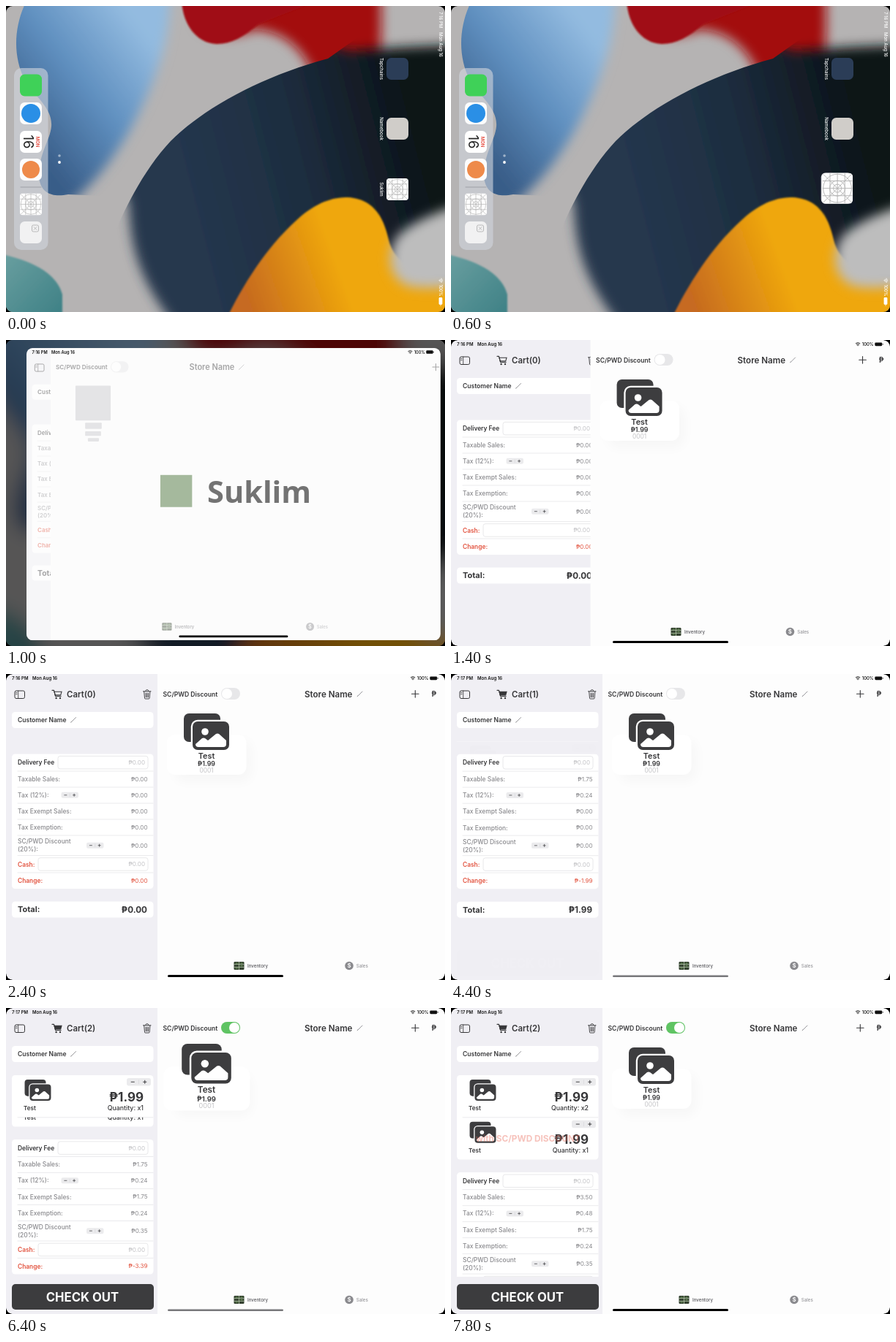
Recreate the animation shown at these times as an HTML page. Size 600 by 419 pixels, loop 8000 ms.

```html
<!DOCTYPE html>
<html lang="en">
<head>
<meta charset="utf-8">
<title>Point of sale demo</title>
<style>
  html, body { margin: 0; width: 100%; height: 100%; overflow: hidden; background: #000; }
  svg { display: block; width: 100vw; height: 100vh; font-family: Inter, Roboto, sans-serif; }
</style>
</head>
<body>
<svg viewBox="0 0 600 419" preserveAspectRatio="none">
  <defs>
    <clipPath id="screen"><rect width="600" height="419" rx="9"/></clipPath>
    <filter id="soft1"><feGaussianBlur stdDeviation="1"/></filter>
    <filter id="soft8" x="-30%" y="-30%" width="160%" height="160%"><feGaussianBlur stdDeviation="8"/></filter>
    <filter id="soft12" x="-30%" y="-30%" width="160%" height="160%"><feGaussianBlur stdDeviation="12"/></filter>
    <linearGradient id="blue" gradientUnits="userSpaceOnUse" x1="45" y1="205" x2="215" y2="70">
      <stop offset="0" stop-color="#395d88"/><stop offset=".5" stop-color="#5f8fbf"/><stop offset="1" stop-color="#93bbe0"/>
    </linearGradient>
    <linearGradient id="navy" gradientUnits="userSpaceOnUse" x1="250" y1="270" x2="565" y2="190">
      <stop offset="0" stop-color="#25374e"/><stop offset=".5" stop-color="#1d2d3f"/><stop offset="1" stop-color="#0c1318"/>
    </linearGradient>
    <linearGradient id="orange" gradientUnits="userSpaceOnUse" x1="325" y1="390" x2="450" y2="345">
      <stop offset="0" stop-color="#c66a20"/><stop offset="1" stop-color="#efa70c"/>
    </linearGradient>
    <linearGradient id="teal" x1="0" y1="0" x2="1" y2="1">
      <stop offset="0" stop-color="#6a9fa0"/><stop offset="1" stop-color="#3d8085"/>
    </linearGradient>
    <!-- Sharp edges are clips; the blurred shapes inside reach past them -->
    <clipPath id="blueEdge"><path d="M27 -5 C10 30 10 70 25 100 C40 125 64 140 62 165 C60 185 45 200 45 235 C48 258 65 262 85 258 L130 260 L300 200 V-5Z"/></clipPath>
    <clipPath id="navyEdge"><path d="M130 425 L145 320 C160 280 190 222 225 185 C270 140 350 96 440 72 L520 15 L620 -5 V425Z"/></clipPath>

    <symbol id="wallpaper" viewBox="0 0 600 419">
      <rect width="600" height="419" fill="#b5b3b3"/>
      <g clip-path="url(#blueEdge)">
        <path d="M-40 -40 V290 H60 C125 250 170 180 200 105 C218 60 226 20 224 -40Z" fill="url(#blue)" filter="url(#soft8)"/>
      </g>
      <path d="M262 -40 V25 C280 45 310 44 340 32 C375 34 405 55 420 95 H508 C515 50 512 0 512 -40Z" fill="#a30f11" filter="url(#soft8)"/>
      <path d="M240 -5 C244 35 268 52 288 52 C308 52 325 42 345 25 L420 -5Z" fill="#a00e12" filter="url(#soft1)"/>
      <g clip-path="url(#navyEdge)">
        <path d="M660 52 C600 54 530 56 470 62 L400 40 L250 95 L140 215 L168 270 C170 330 180 375 240 450 H660Z" fill="url(#navy)" filter="url(#soft8)"/>
      </g>
      <path d="M303 425 C328 374 361 324 404 287 C430 266 450 262 467 262 C500 264 515 285 523 320 C530 350 560 370 620 372 V425Z" fill="url(#orange)" filter="url(#soft1)"/>
      <path d="M660 258 C600 278 550 295 533 318 C518 345 525 375 552 384 C580 389 620 383 660 378Z" fill="#bdbdbd" filter="url(#soft8)"/>
      <path d="M-5 340 C40 350 70 368 77 395 L77 425 H-5Z" fill="url(#teal)" filter="url(#soft1)"/>
    </symbol>

    <symbol id="grid" viewBox="0 0 100 100">
      <rect width="100" height="100" rx="13" fill="#fdfdfd"/>
      <g fill="none" stroke="#b4b4b4" stroke-width="2.2">
        <path d="M4 4 96 96M4 96 96 4M26 2V98M50 2V98M74 2V98M2 26H98M2 50H98M2 74H98"/>
        <circle cx="50" cy="50" r="13"/><circle cx="50" cy="50" r="25"/><circle cx="50" cy="50" r="46"/>
      </g>
    </symbol>

    <symbol id="photos" viewBox="-3 -3 68 56">
      <rect width="50" height="39" rx="7" fill="#3d3d3f"/>
      <rect x="12" y="11" width="50" height="39" rx="7" fill="#3d3d3f" stroke="#fff" stroke-width="4.5" paint-order="stroke"/>
      <circle cx="29" cy="25" r="4.8" fill="#fff"/>
      <path d="M16 42 25 34Q27 33 29 34L33 37 44 28Q46 27 48 28L58 37V42Q58 46 54 46H20Q16 46 16 42Z" fill="#fff"/>
    </symbol>
  </defs>
  <g id="scene"></g>
</svg>

<script>
const LOOP = 8000, STEP = 200;
const INK = '#363638', GREY = '#88888c', PALE = '#c3c3c6', RED = '#e2533f', PANEL = '#f0eff4';
const APP = 'Suklim';
const ROW = 57.8;

const clamp = v => Math.max(0, Math.min(1, v));
const lerp = (a, b, k) => a + (b - a) * k;
const ease = v => (1 - Math.cos(Math.PI * clamp(v))) / 2;
const peso = v => '₱' + v.toFixed(2);

const text = (x, y, size, str, { fill = INK, weight = 600, anchor = 'start', turn = 0, more = '' } = {}) =>
  `<text transform="translate(${x} ${y}) rotate(${turn})" y="${size * 0.36}" font-size="${size}" font-weight="${weight}" fill="${fill}" text-anchor="${anchor}" ${more}>${str}</text>`;
const rect = (x, y, w, h, rx, fill, more = '') =>
  `<rect x="${x}" y="${y}" width="${w}" height="${h}" rx="${rx}" fill="${fill}" ${more}/>`;
const line = (d, color = INK, width = 1) =>
  `<path d="${d}" fill="none" stroke="${color}" stroke-width="${width}" stroke-linecap="round" stroke-linejoin="round"/>`;
const use = (id, x, y, w, h) => `<use href="#${id}" x="${x}" y="${y}" width="${w}" height="${h}"/>`;
const circle = (x, y, r, fill) => `<circle cx="${x}" cy="${y}" r="${r}" fill="${fill}"/>`;
const group = (transform, body, more = '') => `<g transform="${transform}" ${more}>${body}</g>`;

function statusIcons(x, y, fill) {
  return line(`M${x - 8.5} ${y - 1.2}q2.8-2.4 5.6 0M${x - 7.4} ${y + .3}q1.7-1.3 3.4 0`, fill, .9) + circle(x - 5.7, y + 1.7, .7, fill) +
    text(x, y, 5.9, '100%', { fill, weight: 500 }) + rect(x + 17.5, y - 2.4, 10, 4.8, 1.4, fill) + rect(x + 28, y - .8, .9, 1.6, .4, fill);
}

// Home screen, shown with the device turned sideways
function home(t) {
  const white = { fill: '#fff', weight: 500, turn: 90 };
  const label = (y, str) => text(513, y, 6.1, str, { ...white, anchor: 'middle' });
  const tile = (x, y, fill) => rect(x - 15, y - 15, 30, 30, 6.5, fill);
  const launching = t >= 600;
  const dock = rect(11, 85, 46.5, 249, 10, 'rgba(208,213,222,.62)') +
    tile(34, 108.5, '#3fd158') +
    tile(34, 147, '#fcfcfc') + circle(34, 147, 13, '#2a8fe6') +
    tile(34, 186, '#fff') + text(43, 186, 6, 'MON', { fill: '#e5483c', anchor: 'middle', turn: 90 }) +
    text(30.5, 186, 18.5, '16', { fill: '#222', weight: 400, anchor: 'middle', turn: 90 }) +
    tile(34, 224, '#fcfcfc') + circle(34, 224, 12, '#ee8a4a') +
    line('M20 248H48', 'rgba(110,115,125,.6)', .8) +
    use('grid', 19, 256.5, 30, 30) +
    tile(34, 310, '#f1f1f2') + rect(35.5, 300, 9, 9, 2, 'none', 'stroke="#aaa" stroke-width=".8"') + line('M38 302.5l4 4m0-4l-4 4', '#aaa', .7);

  let icon = use('grid', 520, 236, 30, 30) + label(251, APP);
  if (launching) {
    const k = t >= 800 ? 1 : .25, size = lerp(30, 79, k);
    const x = lerp(520, 468, k), y = lerp(236, 206, k);
    icon = rect(x - 5 * k, y, size, size, 8 * k + 4, '#dcdcde') + use('grid', x, y, size, size);
  }
  return use('wallpaper', 0, 0, 600, 419) +
    group(`translate(${t >= 800 ? -1.3 : 0} 0)`, dock) +
    circle(73, 205, 1.8, 'rgba(255,255,255,.5)') + circle(73, 214, 1.9, '#fff') +
    tile(535, 86, '#2b3d57') + label(86, 'Tapchains') +
    tile(535, 168, '#d0cdc9') + label(168, 'Namebook') + icon +
    text(594, 8, 6, '7:16 PM', white) + text(594, 36, 6, 'Mon Aug 16', white) +
    group('translate(594 381.5) rotate(90)', statusIcons(0, 0, '#fff'));
}

const stepper = (x, y, w, h) => {
  const a = x + w * .25, b = x + w * .75, m = y + h / 2, r = h * .2;
  return rect(x, y, w, h, h * .28, '#ebebed') + line(`M${x + w / 2} ${y + h * .25}v${h * .5}`, '#cfcfd2', .5) +
    line(`M${a - r} ${m}h${2 * r}M${b - r} ${m}h${2 * r}M${b} ${m - r}v${2 * r}`, INK, h * .09);
};
const pencil = (x, y) => line(`M${x} ${y + 7}l6.5-6.5`, '#98989c', 1) + line(`M${x - .3} ${y + 7.4}l.5-1.2`, '#98989c', .7);

function cartRow(top, quantity) {
  const end = { anchor: 'end' };
  return use('photos', 23.8, top + 4.3, 39.4, 32.5) + text(24, top + 45, 8.1, 'Test') +
    stepper(165, top + 4, 33, 10.5) +
    text(188, top + 30, 17, peso(1.99), { ...end, weight: 700 }) +
    text(188, top + 45, 8.8, 'Quantity: x' + quantity, { ...end, weight: 500 });
}

function summary(top, v) {
  const end = { anchor: 'end', weight: 400, fill: GREY };
  const grey = { fill: GREY, weight: 500 };
  const field = (x, y) => rect(x, y - 8.8, 194 - x, 17.5, 3, '#fff', 'stroke="#e3e3e5" stroke-width=".8"') +
    text(190, y, 8.1, peso(0), { ...end, fill: PALE });
  const entry = (y, name, value) => text(16, y, 8.45, name, grey) + text(193.5, y, 8.1, peso(value), end);
  const seps = [23.5, 45.5, 67.5, 89.5, 111.5, 139, 162.5].map(y => `M16 ${y}H201`).join('');
  const body = rect(8, 0, 193.5, 184.5, 4.5, '#fff') + line(seps, '#e2e2e5', .7) +
    text(16, 11.7, 8.4, 'Delivery Fee') + field(71, 11.7) +
    entry(34.3, 'Taxable Sales:', v.taxable) +
    entry(56.3, 'Tax (12%):', v.tax) + stepper(75.5, 52.3, 23.5, 8) +
    entry(78.5, 'Tax Exempt Sales:', v.exempt) +
    entry(100.8, 'Tax Exemption:', v.exemption) +
    text(16, 119.8, 8.45, 'SC/PWD Discount', grey) + text(16, 130.8, 8.45, '(20%):', grey) +
    text(193.5, 125.2, 8.1, peso(v.discount), end) + stepper(110, 121.2, 23.5, 8) +
    text(16, 151, 8.4, 'Cash:', { fill: RED }) + field(44, 151) +
    text(16, 173.5, 8.4, 'Change:', { fill: RED }) +
    text(193.5, 173.5, 8.1, v.total ? '₱-' + v.total.toFixed(2) : peso(0), { ...end, fill: RED }) +
    rect(8, 202, 193.5, 22, 4.5, '#fff') + text(16, 213, 11, 'Total:', { weight: 700 }) +
    text(193, 213, 11.7, peso(v.total), { anchor: 'end', weight: 700 });
  return group(`translate(0 ${top})`, body);
}

function totals(t) {
  const v = { taxable: 0, tax: 0, exempt: 0, exemption: 0, discount: 0, total: 0 };
  if (t >= 4400) Object.assign(v, { taxable: 1.75, tax: .24, total: 1.99 });
  if (t >= 6400) Object.assign(v, { exempt: 1.75, exemption: .24, discount: .35, total: 3.39 });
  if (t >= 7600) Object.assign(v, { taxable: 3.5, tax: .48, total: 5.38 });
  return v;
}

function sidebar(t) {
  const first = ease((t - 4390) / 290), second = ease((t - 6310) / 290);
  const count = t >= 6400 ? 2 : t >= 4400 ? 1 : 0;
  const height = ROW * (first + second), bottom = 92 + height, split = 92 + ROW;
  let out = rect(0, 0, 207.5, 419, 0, PANEL) +
    rect(12, 23, 13.5, 10.5, 2, 'none', `stroke="${INK}" stroke-width="1"`) + line('M16.7 23v10.5M13.6 25.5h1.4M13.6 27.5h1.4', INK, .8) +
    line('M63 22.3h2.5l2.2 8.2h7.4', INK, 1.2) +
    `<path d="M66 24.3h10l-1.3 4.6h-7.5z" fill="${count ? INK : 'none'}" stroke="${INK}" stroke-width="1.1"/>` +
    circle(68.6, 33, 1.2, INK) + circle(74, 33, 1.2, INK) +
    text(83, 28, 11.4, `Cart(${count})`) +
    line('M187.5 23.8h10.5M190.8 23.5q0-2 2-2t2 2M188.7 24l.8 9q.1 1 1 1h4.6q.9 0 1-1l.8-9M191 26.2l.2 5.6M192.8 26.2v5.6M194.6 26.2l-.2 5.6', INK, .9) +
    rect(8, 52, 193.5, 22, 4.5, '#fff') + text(16, 63, 8.5, 'Customer Name') + pencil(89, 59) +
    rect(8, 92, 193.5, height, Math.min(4.5, height / 2), '#fff');
  if (first) out += group('', cartRow(92, t >= 7600 ? 2 : 1), `opacity="${first}"`);
  if (second) {
    const note = t < 6800 ? '' : text(34, bottom - 28.5, 11.8, 'with SC/PWD DISCOUNT', { fill: '#e8604f', weight: 700, more: 'opacity=".38"' });
    out += `<clipPath id="slot"><rect y="${split}" width="207" height="${bottom - split}"/></clipPath>` +
      line(`M16 ${split}H201`, '#e2e2e5', .7) +
      group('', cartRow(bottom - ROW, 1) + note, 'clip-path="url(#slot)"');
  }
  out += summary(bottom + 17.5, totals(t));
  if (first) out += group('', rect(0, 368, 207, 51, 0, PANEL) + rect(8, 378, 194, 35, 5, '#3c3c3e') +
    text(104.5, 396, 16.7, 'CHECK OUT', { fill: '#fff', weight: 700, anchor: 'middle' }), `opacity="${first}"`);
  return out;
}

function press(t, start) {
  const d = t - start;
  return d <= 0 || d > 650 ? 0 : clamp(d / 90) ** 2 * Math.exp(-Math.max(d - 90, 0) / 180);
}

function card(t) {
  const mid = { anchor: 'middle' };
  if (t < 1400) return [[245, 54, 51, 50], [259, 107, 24, 9], [259, 119.5, 23, 6.5], [263, 129, 16, 5]]
    .map(([x, y, w, h]) => rect(x - 2, y, w, h, 1, '#c6c6ca')).join('');
  const scale = 1 + .09 * (press(t, 4395) + press(t, 6310));
  return rect(230, 90, 106, 58, 14, '#000', 'opacity=".025" filter="url(#soft8)"') +
    group(`translate(274 110) scale(${scale}) translate(-274 -110)`,
      rect(220, 83, 108.5, 55, 11, '#fff') + use('photos', 240, 51, 68, 56) +
      text(274, 112, 10.8, 'Test', mid) + text(274, 123.3, 8.8, peso(1.99), mid) +
      text(274, 131.8, 8.4, '0001', { ...mid, fill: PALE, weight: 400 }));
}

function toggle(k) {
  return rect(294, 19, 26, 16, 8, '#e7e7e9') + rect(294, 19, 26, 16, 8, '#5fc463', `opacity="${k}"`) +
    circle(302 + 10 * k, 27, 7, '#fff');
}

function pane(t, slide) {
  const away = 1 - slide;
  const tabs = group(`translate(${-115 * away} 0)`,
      rect(311.5, 394, 14, 11, 1.2, '#33402f') + line('M312 397.6h13M312 401.4h13M318.5 394.3v10.4', '#b9cfae', .8) +
      line('M314 396h2.6M320.6 399.5h2.6M314 403h2.6M320.6 396h2.6', '#6f9a5c', 1) +
      text(330, 399.7, 6.2, 'Inventory', { fill: '#55555a', weight: 500 })) +
    group(`translate(${-58 * away} 0)`,
      circle(469, 399.5, 5.8, '#8a8a8e') + text(469, 399.5, 8, '$', { fill: '#fff', anchor: 'middle' }) +
      text(478.7, 399.7, 6.2, 'Sales', { fill: '#96969a', weight: 500 }));
  return rect(207 - 172 * away, 0, 600, 419, 0, '#fdfdfd') +
    group(`translate(${-172 * away} 0)`,
      text(214.5, 27.5, 8.6, 'SC/PWD Discount') + toggle(ease((t - 5720) / 320)) +
      text(408, 27.5, 11.6, 'Store Name') + pencil(480.5, 23.5) + card(t)) +
    group(`translate(${34 * away} 0)`,
      line('M554.5 27.3h9.6M559.3 22.5v9.6', INK, 1.1) + text(585, 27.5, 9.8, '₱', { anchor: 'middle' })) + tabs;
}

function app(t) {
  const grow = t >= 1400 ? 1 : t >= 1200 ? .88 : 0;
  const slide = ease((t - 1000) / 500);
  const splash = clamp(1 - (t - 1000) / 320);
  const dim = t >= 4400 && t < 6800;
  let body = sidebar(t) + pane(t, slide);
  if (splash) body += rect(0, 0, 600, 419, 0, '#fcfcfc', `opacity="${.57 * splash}"`) +
    group('', rect(194, 182, 46, 46, 0, '#7d9a70') +
      text(262, 206, 44, APP, { weight: 700, fill: '#333', more: 'font-family="Noto Sans, Open Sans, sans-serif"' }), `opacity="${.68 * splash}"`);
  body += text(8, 5.8, 6, t < 4400 ? '7:16 PM' : '7:17 PM', { fill: '#111' }) +
    text(36, 5.8, 6, 'Mon Aug 16', { fill: '#111' }) + statusIcons(561.8, 5.8, '#111') +
    rect(221, dim ? 412.5 : 412, 158, dim ? 2.4 : 3, 1.5, dim ? '#77777a' : '#000');
  const backdrop = grow === 1 ? '' :
    group('translate(-40 -28) scale(1.13)', use('wallpaper', 0, 0, 600, 419), 'filter="url(#soft12)"') +
    rect(0, 0, 600, 419, 0, '#000', 'opacity=".52"');
  return backdrop + group(
    `translate(${lerp(28, 0, grow)} ${lerp(11, 0, grow)}) scale(${lerp(.943, 1, grow)} ${lerp(.955, 1, grow)})`,
    body, 'clip-path="url(#screen)"');
}

const scene = document.getElementById('scene');
let shown = -1;
function tick() {
  const t = Math.floor(performance.now() % LOOP / STEP) * STEP;
  if (t !== shown) {
    shown = t;
    scene.innerHTML = group('', t < 1000 ? home(t) : app(t), 'clip-path="url(#screen)"');
  }
  requestAnimationFrame(tick);
}
tick();
</script>
</body>
</html>
```
